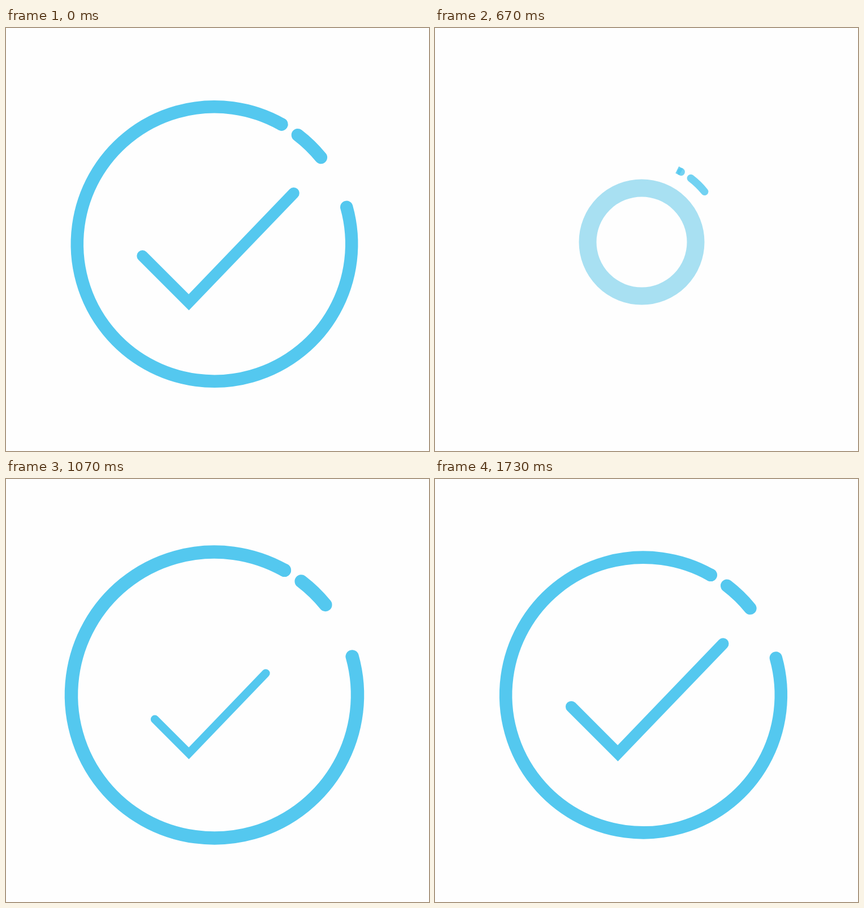
Write an HTML page with a canvas that moves like this. It is 748 px wide and 748 px high and loops after 1800 ms.

```html
<!DOCTYPE html>
<html lang="en">
<head>
<meta charset="utf-8">
<title>Check mark</title>
<style>
  html, body { margin: 0; height: 100%; overflow: hidden; background: #fefefe; }
  canvas { display: block; width: 100vw; height: 100vh; }
</style>
</head>
<body>
<canvas id="stage" width="748" height="748"></canvas>
<script>
const ctx = document.getElementById('stage').getContext('2d');
const LOOP = 1800, STEPS = 27;
const BLUE = '#54c8ef', PALE = '#a8e0f2';
const CX = 368.5, CY = 382, RADIUS = 242.7, WIDTH = 22.5;
const rad = deg => deg * Math.PI / 180;

// Keys are [ms, value]; motion eases in and out between neighbours.
const iconScale = [[270, 1], [330, 1.0825], [530, 0], [600, 0], [670, .596],
  [1056, 1.043], [1310, .988], [1590, 1.01], [1800, 1]];
const checkScale = [[530, 1], [531, 0], [908, 0], [1175, 1.115], [1390, .95], [1610, 1.012], [1800, 1]];
const ringRadius = [[600, 0], [670, 95.5], [870, 148]];
const ringWidth = [[600, 60], [670, 31], [870, 0]];

function at(keys, t) {
  const i = keys.findIndex(key => key[0] > t);
  if (i < 0) return keys[keys.length - 1][1];
  if (i === 0) return keys[0][1];
  const [t0, a] = keys[i - 1], [t1, b] = keys[i];
  const p = (t - t0) / (t1 - t0);
  return a + (b - a) * p * p * (3 - 2 * p);
}

function arc(from, to, cap, ccw = false) {
  ctx.lineCap = cap;
  ctx.beginPath();
  ctx.arc(0, 0, RADIUS, rad(from), rad(to), ccw);
  ctx.stroke();
}

function drawRing(t) {
  if (t <= 600 || t >= 870) return;
  ctx.strokeStyle = PALE;
  ctx.globalAlpha = Math.min(1, (870 - t) / 200);
  ctx.lineWidth = at(ringWidth, t);
  ctx.beginPath();
  ctx.arc(365.5, 378.5, at(ringRadius, t), 0, 2 * Math.PI);
  ctx.stroke();
  ctx.globalAlpha = 1;
}

function drawCircle(t, scale) {
  const start = -60.7, sweep = 314.9;
  const trim = t < 600 ? 1 : Math.min(1, .01 + (t - 670) * .807 / 260);
  const lag = t < 600 ? 0 : Math.max(0, 1 - scale);
  ctx.save();
  ctx.translate(CX - 10 * lag, CY - 3.5 * lag);
  ctx.scale(scale, scale);
  ctx.lineWidth = WIDTH;
  arc(-52.6, -39.1, 'round');
  if (trim > 0) {
    arc(start, start - sweep * trim, trim < 1 ? 'butt' : 'round', true);
    arc(start, start - .05, 'round', true);
  }
  ctx.restore();
}

function drawCheck(t, scale) {
  const size = at(checkScale, t);
  if (size <= 0) return;
  ctx.save();
  if (t < 600) {
    ctx.translate(CX, CY);
    ctx.scale(scale, scale);
    ctx.translate(-CX, -CY);
  }
  ctx.translate(323.3, 485);
  ctx.scale(size, size);
  ctx.lineWidth = 20;
  ctx.lineCap = 'round';
  ctx.lineJoin = 'miter';
  ctx.beginPath();
  ctx.moveTo(-82, -82);
  ctx.lineTo(0, 0);
  ctx.lineTo(185.5, -193);
  ctx.stroke();
  ctx.restore();
}

function draw(t) {
  ctx.clearRect(0, 0, 748, 748);
  drawRing(t);
  const scale = at(iconScale, t);
  if (scale <= 0) return;
  ctx.strokeStyle = BLUE;
  ctx.globalAlpha = t < 600 ? 1 : Math.min(1, .82 + (t - 670) / 700);
  drawCircle(t, scale);
  drawCheck(t, scale);
  ctx.globalAlpha = 1;
}

// Fifteen steps a second, each starting on a multiple of 10 ms.
const stepStart = n => Math.round(n * 20 / 3) * 10;

function tick() {
  const t = performance.now() % LOOP;
  let n = STEPS - 1;
  while (stepStart(n) > t) n--;
  draw(stepStart(n));
  requestAnimationFrame(tick);
}
tick();
</script>
</body>
</html>
```
